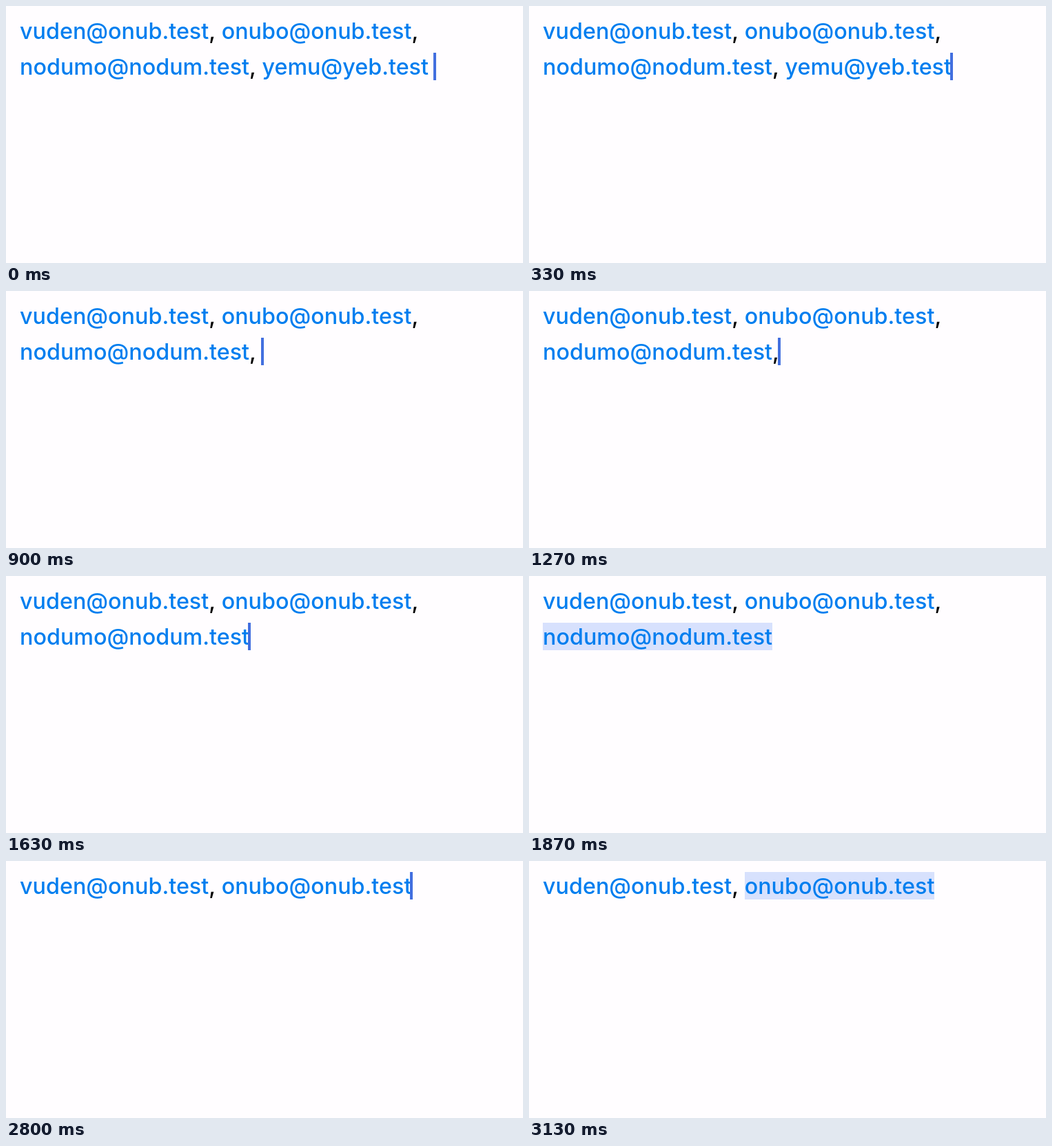
Animation of 750x374 px, one loop 3.16 s. Source, as an HTML page:

```html
<!DOCTYPE html>
<html lang="en">
<head>
<meta charset="utf-8">
<title>Deleting addresses</title>
<style>
  html, body { margin: 0; width: 100%; height: 100%; overflow: hidden; background: #fffdff; }
  svg { display: block; width: 750px; height: 374px; }
  text { font: 450 32.3px Inter, "Liberation Sans", sans-serif; fill: #000; white-space: pre; }
  .link { fill: #007eef; }
  .caret { fill: #426fdf; }
  .selection { fill: #d7e1fd; }
</style>
</head>
<body>
<svg viewBox="0 0 750 374"></svg>
<script>
const LOOP = 3160, LEFT = 20, TOP = 16, LINE = 52, BAR = 40, BASELINE = 32;
const svg = document.querySelector("svg");

function add(tag, attrs, content = "") {
  const node = document.createElementNS("http://www.w3.org/2000/svg", tag);
  for (const key in attrs) node.setAttribute(key, attrs[key]);
  node.textContent = content;
  return svg.appendChild(node);
}

function measure(string) {
  const probe = add("text", {}, string);
  const width = probe.getComputedTextLength();
  probe.remove();
  return width;
}

const comma = measure(",");
const space = measure("a a") - measure("aa");
const selection = add("rect", { class: "selection", height: BAR });

// Each line flows from the left margin: address, comma, space, address.
const entries = [
  ["vuden@onub.test", "onubo@onub.test"],
  ["nodumo@nodum.test", "yemu@yeb.test"]
].flatMap((line, row) => {
  let x = LEFT;
  const y = TOP + row * LINE;
  return line.map(address => {
    const start = x, end = x + measure(address);
    x = end + comma + space;
    return {
      start, end, y,
      link: add("text", { class: "link", x: start, y: y + BASELINE }, address),
      comma: add("text", { x: end, y: y + BASELINE }, ",")
    };
  });
});

const caret = add("rect", { class: "caret", width: 4, height: BAR });
const [, second, third, fourth] = entries;

// count: addresses left; commas: commas left; caret position or selected entry.
const steps = [
  { at: 0,    count: 4, commas: 3, row: fourth, caret: fourth.end + space },
  { at: 270,  count: 4, commas: 3, row: fourth, caret: fourth.end },
  { at: 570,  count: 4, commas: 3, selected: fourth },
  { at: 870,  count: 3, commas: 3, row: third, caret: fourth.start },
  { at: 1170, count: 3, commas: 3, row: third, caret: third.end + comma },
  { at: 1430, count: 3, commas: 2, row: third, caret: third.end },
  { at: 1730, count: 3, commas: 2, selected: third },
  { at: 2030, count: 2, commas: 2, row: second, caret: second.end + comma + space },
  { at: 2370, count: 2, commas: 2, row: second, caret: second.end + comma },
  { at: 2630, count: 2, commas: 1, row: second, caret: second.end },
  { at: 2930, count: 2, commas: 1, selected: second }
];

const show = (node, on) => node.setAttribute("visibility", on ? "visible" : "hidden");

function render(time) {
  const step = steps.filter(s => s.at <= time).pop();
  entries.forEach((entry, i) => {
    show(entry.link, i < step.count);
    show(entry.comma, i < step.commas);
  });
  show(caret, !step.selected);
  show(selection, step.selected);
  if (step.selected) {
    const { start, end, y } = step.selected;
    selection.setAttribute("x", Math.round(start));
    selection.setAttribute("y", y);
    selection.setAttribute("width", Math.round(end) - Math.round(start));
  } else {
    caret.setAttribute("x", Math.round(step.caret) - 2);
    caret.setAttribute("y", step.row.y);
  }
}

const origin = performance.now();
function tick() {
  render((performance.now() - origin) % LOOP);
  requestAnimationFrame(tick);
}
tick();
</script>
</body>
</html>
```
